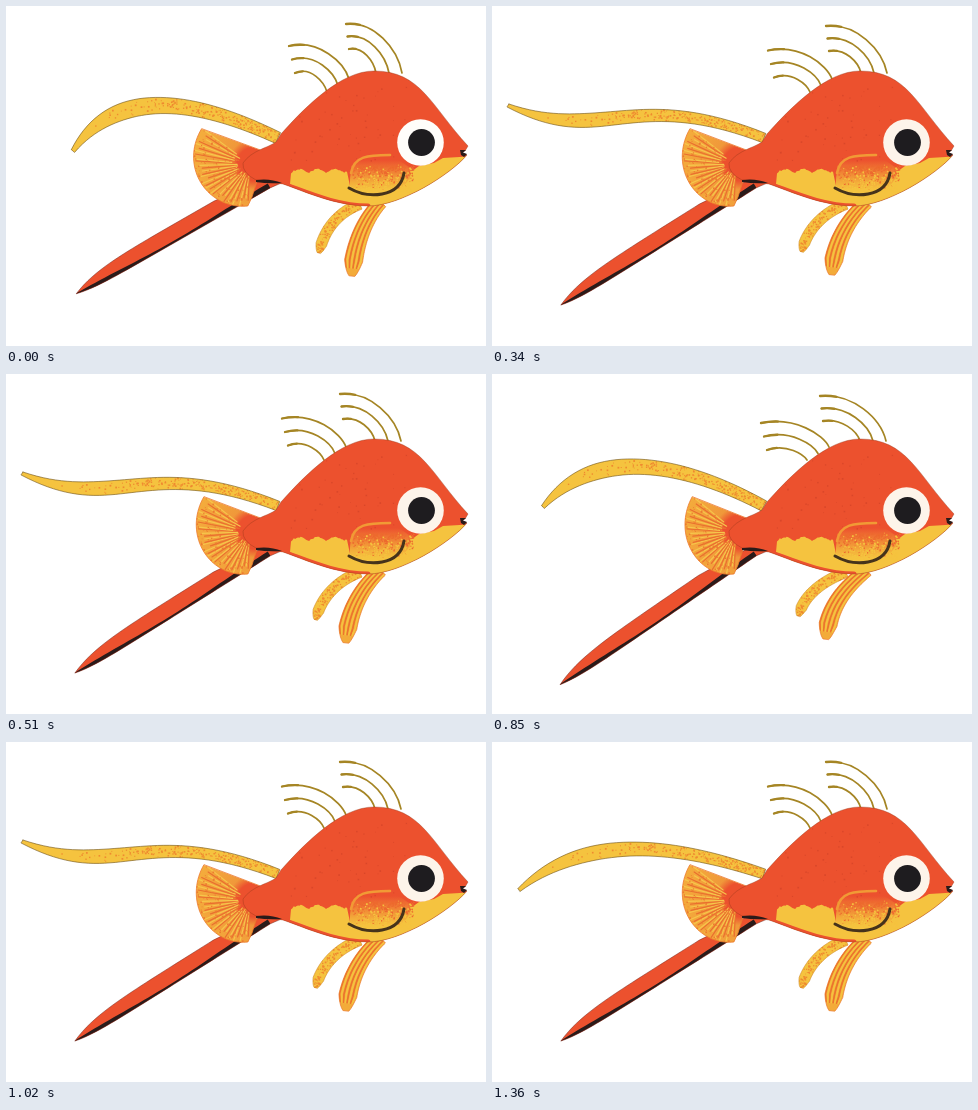
Write an HTML page with a canvas that moves like this. It is 480 by 340 pixels and loops after 1530 ms.

```html
<!DOCTYPE html>
<html lang="en">
<head>
<meta charset="utf-8">
<title>Swimming fish</title>
<style>
html, body { margin: 0; width: 100%; height: 100%; overflow: hidden; background: #fff; }
canvas { display: block; }
</style>
</head>
<body>
<canvas id="stage" width="480" height="340"></canvas>
<script>
const ctx = document.getElementById('stage').getContext('2d');
const RED = '#ec512e', YELLOW = '#f5c33f', AMBER = '#ef8a30', DARK = '#2a1b1a', OLIVE = '#a58524';
const STEP = 170, ORDER = 'ABCCDDCCB';

// sway drives every limb; ribbon holds the tip and two curve handles.
const POSES = {
  A: { sway: 0, girth: 17, ribbon: [[67, 145], [110, 80], [190, 93]] },
  B: { sway: 1, girth: 14.5, ribbon: [[27, 148], [95, 88], [190, 104]] },
  C: { sway: 1, girth: 14, ribbon: [[16, 99.5], [110, 140], [140, 80]] },
  D: { sway: 2, girth: 16, ribbon: [[51, 133], [100, 74], [185, 85]] }
};

const BODY = new Path2D('M275 128C300 100 335 65 368 65C415 65 425 100 462 140L459 145L455 146L461 149' +
  'C445 168 395 200 362 200C330 200 300 186 277 178L250 174Q236 167 237 157C246 144 262 142 270 136Z');
const CHEEK = new Path2D('M344 180C343 156 352 150 384 150Q398 156 406 164C400 196 358 190 344 180Z');
const CHEEK_RIM = new Path2D('M345 167C348 150 362 149 384 149');
const BELLY_RIM = new Path2D('M277 178C300 186 330 200 362 200');
const SMILE = new Path2D('M343 182C362 193 394 192 398 167');
const NOTCH = new Path2D('M250 174Q264 172 276 177Q262 178 250 176Z');
const MOUTH = new Path2D('M454 144L460 144L457 146.5L461 148L458 151L455 149Z');

let seed = 1;
function rnd() {
  seed = (seed * 16807) % 2147483647;
  return seed / 2147483647;
}
const jitter = size => (rnd() + rnd() - 1) * size;

function fill(path, color) {
  ctx.fillStyle = color;
  ctx.fill(path);
}
function stroke(path, color, width) {
  ctx.strokeStyle = color;
  ctx.lineWidth = width;
  ctx.stroke(path);
}
function inside(path, draw) {
  ctx.save();
  ctx.clip(path);
  draw();
  ctx.restore();
}
function polygon(points) {
  const path = new Path2D();
  points.forEach(([x, y]) => path.lineTo(x, y));
  path.closePath();
  return path;
}
function specks(count, color, place) {
  ctx.fillStyle = color;
  for (let i = 0; i < count; i++) {
    const [x, y] = place(), r = 0.7 + rnd() * 1.1;
    ctx.fillRect(x - r / 2, y - r / 2, r, r);
  }
}

// Samples f(0..1) into a list of points.
const trace = (f, n = 40) => Array.from({ length: n + 1 }, (_, i) => f(i / n));

// Limb along a cubic from tip to root; at(t, s) crosses it for s in -1..1.
function limb([a, b, c, d], half) {
  const pos = (t, k) => a[k] * (1 - t) ** 3 + 3 * b[k] * t * (1 - t) ** 2 + 3 * c[k] * t * t * (1 - t) + d[k] * t ** 3;
  const vel = (t, k) => (b[k] - a[k]) * (1 - t) ** 2 + 2 * (c[k] - b[k]) * t * (1 - t) + (d[k] - c[k]) * t * t;
  const at = (t, s) => {
    const vx = vel(t, 0), vy = vel(t, 1), w = half(t) * s / Math.hypot(vx, vy);
    return [pos(t, 0) + vy * w, pos(t, 1) - vx * w];
  };
  const path = polygon([...trace(t => at(t, 1)), ...trace(t => at(1 - t, -1))]);
  return { at, path };
}

function drawRibbon({ ribbon, girth }) {
  const { at, path } = limb([...ribbon, [272, 132]], t =>
    girth / 2 * (0.25 + 0.75 * Math.sin(Math.min(1, t / 0.35) * Math.PI / 2) - 0.5 * Math.max(0, t - 0.4)));
  fill(path, YELLOW);
  inside(path, () => specks(230, AMBER, () => at(0.15 + 0.85 * Math.sqrt(rnd()), jitter(1.2))));
  stroke(path, 'rgba(110,80,20,.75)', 0.8);
}

function drawCrest(sway) {
  for (let i = 0; i < 6; i++) {
    const rear = i > 2, j = i % 3;
    const x = rear ? 283 + 3 * j - 7 * sway : 340 + 1.5 * j - 6 * sway;
    const y = rear ? 40 + 13.5 * j + 4.5 * sway : 18 + 12.5 * j + 2 * sway;
    const rootX = rear ? 343 - 11 * j - 3 * sway : 396 - 13 * j - sway;
    const rootY = rear ? 73 + 6.5 * j : 67;
    const dx = rootX - x, hair = new Path2D();
    hair.moveTo(x, y);
    hair.bezierCurveTo(x + dx * 0.5, y - (rear ? 7 : 3), rootX - dx * 0.08, (y + rootY) / 2, rootX, rootY);
    stroke(hair, OLIVE, 1.7);
    ctx.setLineDash([dx * 0.25, 200]);
    stroke(hair, OLIVE, 2.3);
    ctx.setLineDash([]);
  }
}

function drawTail(sway) {
  const angle = 0.52 + 0.04 * sway, len = 221 + 7 * sway;
  const cos = Math.cos(angle), sin = Math.sin(angle);
  const at = (t, up) => [262 - cos * len * t - sin * up, 178 + sin * len * t - cos * up];
  const top = t => at(t, (6 + 6 * Math.min(1, t * 4)) * (1 - t ** 8));
  const bottom = t => at(t, -4.5 * (1 - t ** 12));
  const shade = t => at(t, -1 + 1.5 * Math.cos(t * Math.PI * 2));
  const path = polygon([[275, 177], ...trace(top), ...trace(t => bottom(1 - t))]);
  fill(path, RED);
  inside(path, () => fill(polygon([...trace(shade), ...trace(t => at(1 - t, -8))]), DARK));
  stroke(path, 'rgba(110,30,20,.6)', 0.8);
}

function drawFan(sway) {
  const hubX = 244, hubY = 158, squash = 1.05 - 0.05 * sway;
  const at = (u, k) => {
    const a = 1.62 + 2.17 * u, r = (42 + 16 * u) * k;
    return [hubX + Math.cos(a) * r * squash, hubY + Math.sin(a) * r];
  };
  const path = polygon([[254, 144], [252, 172], [246, 191], ...trace(u => at(u, 1))]);
  const glow = ctx.createRadialGradient(248, hubY, 6, 248, hubY, 60);
  glow.addColorStop(0.2, RED);
  glow.addColorStop(0.36, '#f0983a');
  glow.addColorStop(1, '#f4ac3c');
  fill(path, glow);
  inside(path, () => {
    for (let i = 0; i < 34; i++) {
      const ray = new Path2D(), u = (i + jitter(0.5)) / 33;
      ray.moveTo(...at(u, 0.2 + rnd() * 0.15));
      ray.lineTo(...at(u, 0.8 + rnd() * 0.2));
      stroke(ray, i % 2 ? '#f6c64b' : '#ea6f2f', 1.2);
    }
    specks(120, '#ed7b30', () => at(rnd(), Math.sqrt(rnd())));
  });
  stroke(path, 'rgba(237,120,45,.8)', 1);
}

function drawFins(sway) {
  const lift = 1.2 * sway * sway;
  const round = t => Math.sqrt(Math.min(1, 0.1 + t * 6));
  const tipX = 313 - 3.2 * sway;
  const back = limb([[tipX, 247 - lift], [tipX + 4, 228 - lift], [328, 208], [354, 198]], t => 5.5 * round(t));
  fill(back.path, YELLOW);
  inside(back.path, () => specks(120, AMBER, () => back.at(rnd(), jitter(1.2))));
  stroke(back.path, 'rgba(205,130,35,.7)', 0.8);

  const endX = 346 - 6 * sway;
  const front = limb([[endX, 270 - lift], [endX + 2, 235 - lift], [361 - 2 * sway, 210], [375, 196]],
    t => 9.5 * round(t) * (1 - 0.3 * t));
  fill(front.path, '#f3ab39');
  inside(front.path, () => {
    for (let i = 0; i < 8; i++) {
      const s = 0.95 - i * 0.25, stripe = new Path2D();
      trace(t => front.at(0.08 + 0.9 * t, s), 12).forEach(p => stripe.lineTo(...p));
      stroke(stripe, i % 2 ? YELLOW : '#ec742d', 1.7);
    }
  });
  stroke(front.path, 'rgba(235,120,45,.8)', 0.9);
}

function drawBody() {
  const ragged = trace(t => [285 + 56 * t, 167 - 4 * Math.abs(Math.sin(t * 10)) + jitter(1)]);
  const belly = polygon([[284, 178], ...ragged, [344, 180], [402, 168], [413, 160], [428, 157], [437, 152],
    [470, 150], [440, 190], [362, 203], [300, 187]]);
  fill(BODY, RED);
  inside(BODY, () => {
    fill(belly, YELLOW);
    const fade = ctx.createLinearGradient(0, 154, 0, 184);
    fade.addColorStop(0, RED);
    fade.addColorStop(0.75, '#f3ad3a');
    fade.addColorStop(1, YELLOW);
    fill(CHEEK, fade);
    specks(240, '#ed6a2f', () => [346 + rnd() * 62, 160 + rnd() * rnd() * 28]);
    specks(240, YELLOW, () => [350 + rnd() * 56, 186 - rnd() * rnd() * 30]);
    specks(60, '#d9472a', () => [285 + rnd() * 130, 80 + rnd() * 75]);
    stroke(CHEEK_RIM, '#f19a35', 2.6);
    stroke(BELLY_RIM, RED, 5);
  });
  stroke(BODY, 'rgba(150,55,25,.5)', 0.8);
  stroke(SMILE, '#46331b', 3);
  fill(NOTCH, DARK);
  fill(MOUTH, DARK);
}

function disc(x, y, r, color) {
  const path = new Path2D();
  path.arc(x, y, r, 0, Math.PI * 2);
  fill(path, color);
}

function drawFish(pose) {
  seed = 4217;
  ctx.fillStyle = '#fff';
  ctx.fillRect(0, 0, 480, 340);
  drawRibbon(pose);
  drawCrest(pose.sway);
  drawTail(pose.sway);
  drawFan(pose.sway);
  drawFins(pose.sway);
  drawBody();
  disc(414.5, 136.5, 23.3, pose.sway ? '#fdf4ea' : '#fffdfa');
  disc(415.5, 136.5, 13.4, '#1e1c1f');
}

ctx.lineCap = ctx.lineJoin = 'round';
const start = performance.now();
let shown = '';
function tick() {
  const key = ORDER[Math.floor((performance.now() - start) / STEP) % ORDER.length];
  if (key !== shown) drawFish(POSES[shown = key]);
  requestAnimationFrame(tick);
}
tick();
</script>
</body>
</html>
```
